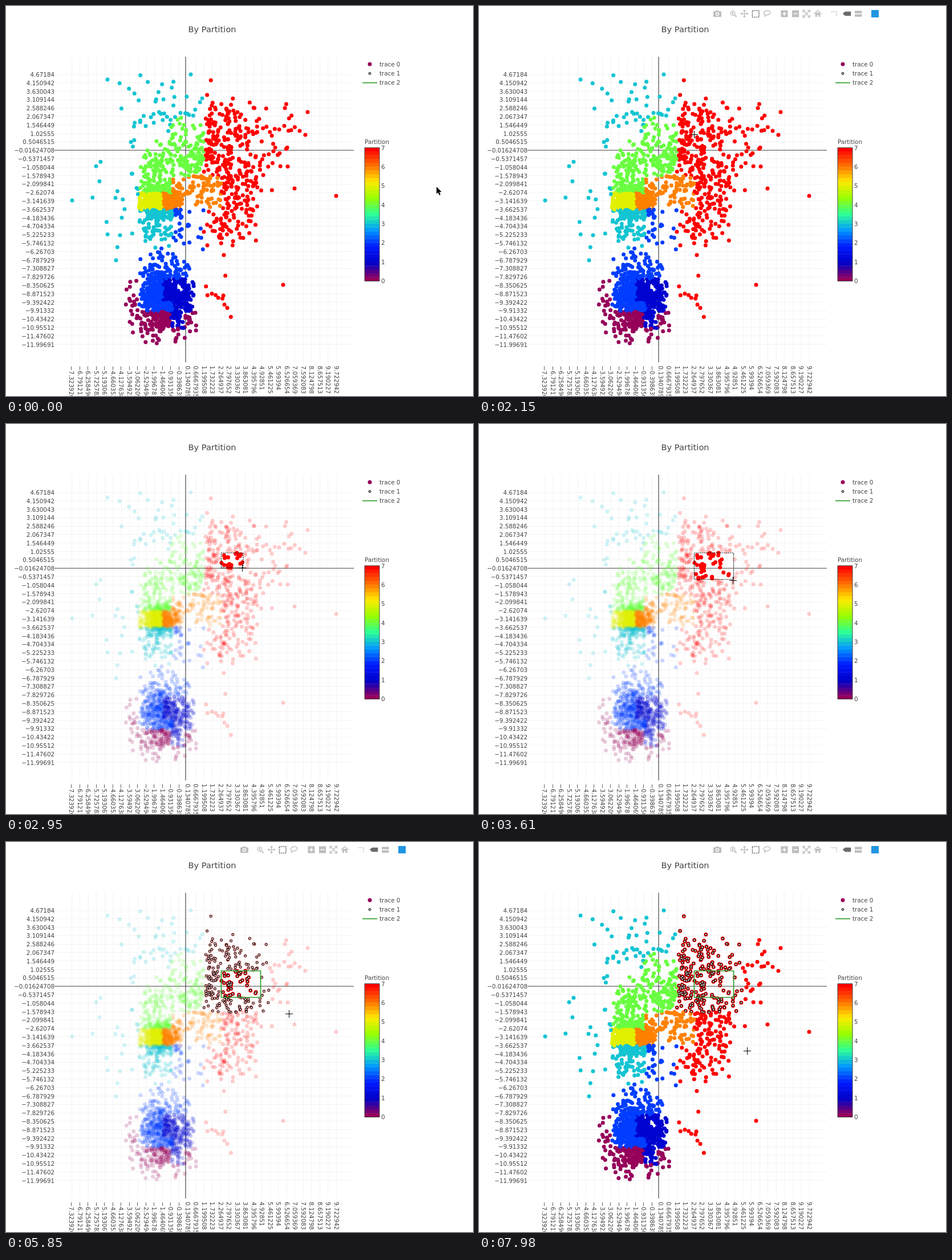
An HTML page with a canvas that plays this animation: 819x684 px, repeating every 8000 ms.

```html
<!DOCTYPE html>
<html lang="en">
<head>
<meta charset="utf-8">
<title>By Partition</title>
<style>
html, body { margin: 0; width: 100%; height: 100%; overflow: hidden; background: #fff; }
canvas { display: block; }
</style>
</head>
<body>
<canvas id="stage" width="819" height="684"></canvas>
<script>
const ctx = document.getElementById('stage').getContext('2d');
const LOOP = 8000;
const FONT = '"DejaVu Sans", sans-serif';
const LABEL_FONT = '11.2px "Liberation Sans", sans-serif';
const INK = '#444', GREEN = '#2ca02c';
const BOX = { x: 377.5, y: 226, x2: 446.5, y2: 272.5 };
const SELECT = 2940, QUERY = 4420, UNHOVER = 5500, RESTORE = 7540;
const tickX = i => 115 + i * 14.516;
const tickY = i => 120 + i * 14.797;

// ---- colour scale ----
const scale = [[150, 0, 90], [0, 0, 200], [0, 25, 255], [0, 152, 255], [44, 255, 150],
  [151, 255, 0], [255, 234, 0], [255, 111, 0], [255, 0, 0]];
function color(part) {
  const s = part / 7 * 8, i = Math.min(7, Math.floor(s)), k = s - i;
  return `rgb(${scale[i].map((c, j) => Math.round(c + (scale[i + 1][j] - c) * k))})`;
}
const palette = [0, 1, 2, 3, 4, 5, 6, 7].map(color);

// ---- points ----
let seed = 7;
function rand() {
  seed = (seed * 1664525 + 1013904223) % 4294967296;
  return seed / 4294967296;
}
function gauss() {
  const g = Math.sqrt(-2 * Math.log(1 - rand())) * Math.cos(2 * Math.PI * rand());
  return Math.abs(g) < 2.2 ? g : gauss();
}

// the plane is split by straight cuts, one colour per cell
function partition(x, y) {
  if (x >= 378 || (x >= 347 && (y < 299 || y > 357))) return 7;
  if (y >= 536) return x > 289 && x < 312 && y < 566 ? 1 : 0;
  if (y >= 425) {
    if (x < 232) return y > 480 ? 0 : 3;
    return y < 478 || x < 275 || (x < 293 && y > 518) ? 2 : 1;
  }
  if (y >= 357) return x < 292 ? 3 : 2;
  if (x < 232 || y < 196 || (x < 290 && y < 236)) return 3;
  if (y >= 327) return x < 274 ? 5 : 6;
  return x >= 290 && y > 298 ? 6 : 4;
}

const points = [];
const add = (x, y) => points.push({ x, y, part: partition(x, y) });

// count, centre and spread of each cloud
const clouds = [
  [760, 270, 343, 18, 15], [100, 262, 290, 20, 27], [50, 262, 382, 18, 15],
  [265, 333, 273, 32, 40], [130, 398, 290, 29, 55], [75, 388, 195, 27, 30],
  [65, 408, 330, 30, 30], [45, 393, 385, 27, 22], [42, 263, 182, 40, 32],
  [14, 185, 350, 25, 45], [26, 476, 240, 15, 35], [32, 300, 400, 24, 24],
  [660, 279, 510, 23, 24], [60, 278, 458, 22, 17], [120, 275, 556, 28, 17],
  [14, 219, 508, 5, 15], [12, 370, 503, 15, 35]
];
for (const [n, cx, cy, sx, sy] of clouds) {
  for (let i = 0; i < n; i++) add(cx + sx * gauss(), cy + sy * gauss());
}
// far outliers
for (const [x, y] of [[116, 341], [178, 129], [158, 281], [193, 446], [324, 120],
  [529, 186], [515, 219], [525, 226], [506, 320], [579, 333], [486, 489]]) add(x, y);

const inside = (p, b) => p.x >= b.x && p.x <= b.x2 && p.y >= b.y && p.y <= b.y2;
const ringed = points.filter(p => p.part === 7 && p.x < 461 && p.y < 299);

// ---- drawing helpers ----
function text(s, x, y, size = 10.3, align = 'left') {
  ctx.font = `${size}px ${FONT}`;
  ctx.textAlign = align;
  ctx.fillStyle = INK;
  ctx.fillText(s, x, y);
}
function line(pts, stroke, width = 1, close = false) {
  ctx.beginPath();
  for (let i = 0; i < pts.length; i += 2) ctx.lineTo(pts[i], pts[i + 1]);
  if (close) ctx.closePath();
  ctx.strokeStyle = stroke;
  ctx.lineWidth = width;
  ctx.stroke();
}
function disc(x, y, r, fill, stroke) {
  ctx.beginPath();
  ctx.arc(x, y, r, 0, 7);
  if (fill) { ctx.fillStyle = fill; ctx.fill(); }
  if (stroke) { ctx.strokeStyle = stroke; ctx.lineWidth = 1.2; ctx.stroke(); }
}
function rect(x, y, w, h, fill) {
  ctx.fillStyle = fill;
  ctx.fillRect(x, y, w, h);
}
function frame(b, stroke, width) {
  line([b.x, b.y, b.x2, b.y, b.x2, b.y2, b.x, b.y2], stroke, width, true);
}
function dashed(pattern, paint) {
  ctx.setLineDash(pattern);
  paint();
  ctx.setLineDash([]);
}
const crisp = v => Math.floor(v) + 0.5;
const tickText = v => String(+v.toPrecision(7)).replace('-', '\u2212');
const ramp = (t, a, b) => Math.max(0, Math.min(1, (t - a) / (b - a)));

// ---- static parts ----
function drawAxes() {
  for (let i = 0; i < 33; i++) {
    const x = crisp(tickX(i)), y = crisp(tickY(i));
    line([x, 89, x, 625], '#f3f3f3');
    line([85, y, 610, y], '#f3f3f3');
  }
  line([315, 89, 315, 625], INK, 1.2);
  line([85, 253, 610, 253], INK, 1.2);
  for (let i = 0; i < 33; i++) {
    text(tickText(4.67184023 - i * 0.52089859), 85, tickY(i) + 4, 10.3, 'right');
    ctx.save();
    ctx.translate(tickX(i), 631);
    ctx.rotate(Math.PI / 2);
    text(tickText(0.1340789 + (i - 14) * 0.53271461), 0, 3.7);
    ctx.restore();
  }
  text('By Partition', 361.5, 46, 14.6, 'center');
}

function drawLegend() {
  disc(638, 102, 3.5, palette[0]);
  disc(638, 118.2, 1.7, '#fff', '#000');
  line([625, 134.6, 651, 134.6], GREEN, 1.7);
  for (let i = 0; i < 3; i++) text('trace ' + i, 655, 106 + i * 16.2);

  text('Partition', 629, 242);
  const bands = 35, h = 234 / bands;
  for (let i = 0; i < bands; i++) {
    rect(629, 482 - (i + 1) * h, 26, h + 0.4, color(i * 7 / (bands - 1)));
  }
  frame({ x: 629, y: 248.5, x2: 655, y2: 482.5 }, INK, 1);
  for (let i = 0; i < 8; i++) text(i, 658, 486 - i * 33.35);
}

// ---- toolbar ----
function drawToolbar(alpha) {
  const pale = '#bdbdbd', dark = '#6b6b6b', y = 13.5;
  const cross = (x, cy, r, width = 1.4) => {
    line([x - r, cy, x + r, cy], pale, width);
    line([x, cy - r, x, cy + r], pale, width);
  };
  ctx.save();
  ctx.globalAlpha = alpha;

  // camera
  rect(411, 9.5, 14, 9.5, pale);
  rect(415, 8, 6, 2, pale);
  disc(418, 14, 3.2, '#fff');
  disc(418, 14, 1.8, pale);

  // zoom and pan
  disc(445, 12.5, 3.9, null, pale);
  line([448, 15.5, 451.5, 19], pale, 2.2);
  cross(445, 12.5, 2);
  cross(465.5, y, 6);
  for (const [a, b] of [[1, 0], [-1, 0], [0, 1], [0, -1]]) {
    const px = 465.5 + a * 4, py = y + b * 4;
    line([px - b * 2, py - a * 2, px + a * 2, py + b * 2, px + b * 2, py + a * 2], pale, 1.3);
  }

  // box select and lasso
  dashed([2, 1.3], () => frame({ x: 479.5, y: 8, x2: 491, y2: 19.5 }, dark, 1.7));
  ctx.beginPath();
  ctx.ellipse(505, 12, 5.8, 3.8, -0.2, 0, 7);
  ctx.strokeStyle = pale;
  ctx.lineWidth = 1.4;
  ctx.stroke();
  line([500.5, 14.5, 502, 17, 500.5, 19], pale, 1.4);

  // zoom in and out
  for (const x of [535.5, 555]) {
    rect(x - 6, 7.5, 12, 12, pale);
    rect(x - 3.5, 12.7, 7, 1.6, '#fff');
  }
  rect(534.7, 10, 1.6, 7, '#fff');

  // autoscale and home
  for (const a of [-1, 1]) for (const b of [-1, 1]) {
    const cx = 574.3 + a * 6, cy = y + b * 6;
    line([574.3, y, cx, cy], pale, 1.3);
    line([cx - a * 4, cy, cx, cy, cx, cy - b * 4], pale, 1.4);
  }
  line([587.5, 14, 594, 8.2, 600.5, 14], pale, 1.6);
  rect(589.8, 13.5, 3, 5.5, pale);
  rect(595.4, 13.5, 3, 5.5, pale);
  rect(590.5, 12, 7, 3.5, pale);

  // spikes, hover modes, square
  dashed([2, 1.5], () => line([618, 10, 627, 10, 627, 19], pale, 1.4));
  line([638, y, 642, 10, 652, 10, 652, 17, 642, 17], dark, 0.5, true);
  ctx.fillStyle = dark;
  ctx.fill();
  rect(659, 8.5, 12.5, 4.3, pale);
  rect(659, 14.5, 12.5, 4.3, pale);
  rect(688, 7, 13, 13, '#2196e3');
  ctx.restore();
}

// ---- moving parts ----
const path = [[0, 755, 317], [170, 755, 317], [900, 382, 238], [1080, 377, 225],
  [2700, 377, 225], [2860, 410, 249], [3520, 445.5, 274], [5490, 445.5, 274], [5850, 497, 301.5],
  [6290, 495.5, 310.5], [6500, 503.5, 330], [6640, 496, 347.5],
  [7780, 496, 347.5], [7980, 470, 366], [LOOP, 470, 366]];
function pointer(t) {
  const i = path.findIndex(k => k[0] > t);
  const [a, ax, ay] = path[i - 1], [b, bx, by] = path[i];
  const k = (t - a) / (b - a);
  return [ax + (bx - ax) * k, ay + (by - ay) * k];
}

function drawPointer(x, y) {
  if (x < 610) {
    x = crisp(x);
    y = crisp(y);
    line([x - 6.5, y, x + 6.5, y], '#000');
    line([x, y - 6.5, x, y + 6.5], '#000');
    return;
  }
  ctx.save();
  ctx.translate(x, y);
  ctx.lineJoin = 'round';
  line([0, 0, 0, 12.5, 2.8, 10, 5, 15, 7, 14, 5, 9.3, 9, 9.3], '#fff', 1.8, true);
  ctx.fillStyle = '#000';
  ctx.fill();
  ctx.restore();
}

function drawPoints(dimmed, area) {
  for (const p of points) {
    ctx.globalAlpha = dimmed && !inside(p, area) ? 0.2 : 1;
    disc(p.x, p.y, 3.5, palette[p.part]);
  }
  ctx.globalAlpha = 1;
}

function drawHover() {
  line([378, 226.5, 385, 221, 385, 218, 502, 218, 502, 235.5, 385, 235.5, 385, 232], '#fff', 1.6, true);
  ctx.fillStyle = GREEN;
  ctx.fill();
  ctx.font = LABEL_FONT;
  ctx.textAlign = 'left';
  ctx.fillText('trace 2', 505, 230.5);
  ctx.fillStyle = '#fff';
  ctx.fillText('(2.300019, 0.9277498)', 386.5, 230.5);
}

function draw(now) {
  const t = now % LOOP;
  const [px, py] = pointer(t);
  const area = { ...BOX, x2: Math.min(BOX.x2, px + 1), y2: Math.min(BOX.y2, py) };

  rect(0, 0, 819, 684, '#fff');
  drawAxes();
  drawPoints(t >= SELECT && t < RESTORE, t < QUERY ? area : BOX);
  if (t >= QUERY) {
    for (const p of ringed) disc(p.x, p.y, 1.8, '#fff', '#200');
    frame(BOX, GREEN, 1.7);
  } else if (t >= SELECT) {
    dashed([2, 1.5], () => frame(area, '#000', 1.2));
  }
  drawLegend();
  drawToolbar(ramp(t, 1400, 1720) - ramp(t, 2740, 2900) + ramp(t, 3840, 4200));
  if (t >= QUERY && t < UNHOVER) drawHover();
  drawPointer(px, py);
  requestAnimationFrame(draw);
}
requestAnimationFrame(draw);
</script>
</body>
</html>
```
